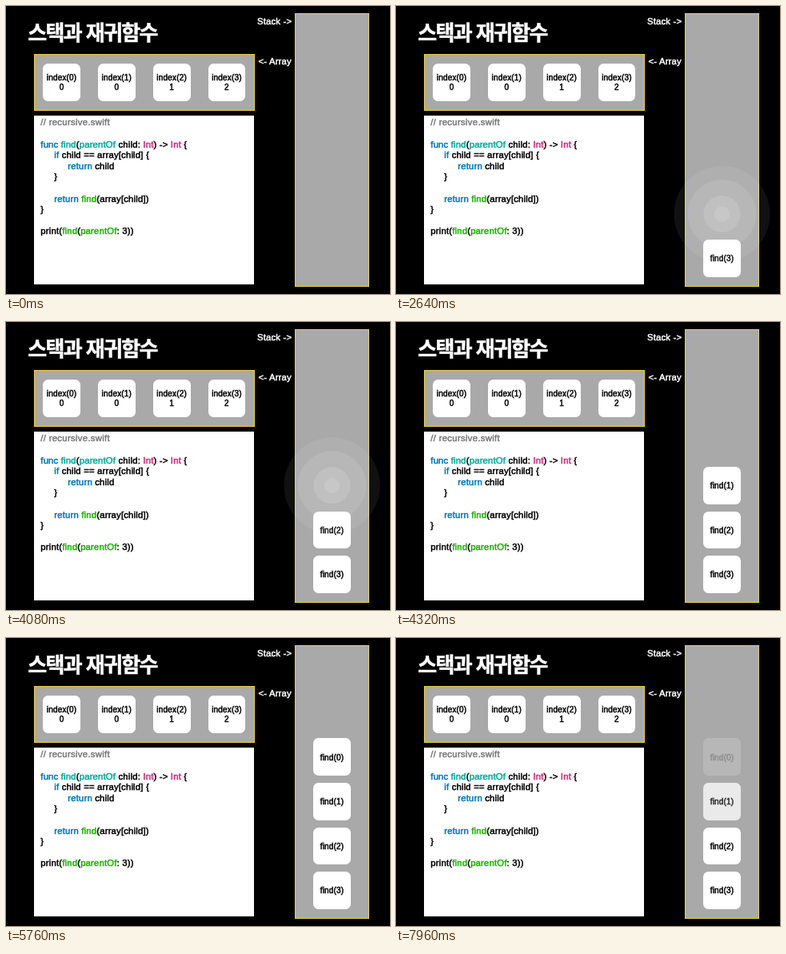
An HTML page that plays this animation: 480 by 360 pixels, repeating every 8 s.

```html
<!DOCTYPE html>
<html lang="ko">
<head>
<meta charset="utf-8">
<title>스택과 재귀함수</title>
<style>
html, body { margin: 0; width: 100%; height: 100%; overflow: hidden; background: #000; }
svg { display: block; width: 480px; height: 360px; }
text { font-family: "Liberation Sans", Arial, sans-serif; white-space: pre; stroke-width: .5px; }
.code, .label { font-size: 11.3px; letter-spacing: .19px; }
.code { fill: #000; stroke: #000; }
.label { fill: #fff; stroke: #fff; }
.cell { font-size: 10px; letter-spacing: .18px; text-anchor: middle; fill: #000; stroke: #000; }
.title { font: 700 26px "Noto Sans CJK KR", "Noto Sans CJK", sans-serif; letter-spacing: -1.65px; fill: #fff; stroke: #fff; }
.code .key { fill: #0076ba; stroke: #0076ba; }
.code .decl { fill: #00a89d; stroke: #00a89d; }
.code .type { fill: #cb297b; stroke: #cb297b; }
.code .call { fill: #1db100; stroke: #1db100; }
.code .note { fill: #797979; stroke: #797979; letter-spacing: .32px; }
</style>
</head>
<body>
<svg id="stage" viewBox="0 0 480 360">
  <defs>
    <filter id="blur" filterUnits="userSpaceOnUse" x="340" y="60" width="140" height="300">
      <feGaussianBlur stdDeviation="5"/>
    </filter>
  </defs>
  <rect width="480" height="360"/>
  <text class="title" x="27.3" y="43.3">스택과 재귀함수</text>
  <text class="label" x="314" y="23">Stack -&gt;</text>
  <text class="label" x="315.5" y="73">&lt;- Array</text>
  <rect x="35.5" y="60.5" width="275" height="70" fill="#a9a9a9" stroke="#f0d030"/>
  <rect x="35" y="137" width="275" height="211" fill="#fff"/>
  <rect x="361.5" y="9.5" width="92" height="341" fill="#a9a9a9" stroke="#dccf70"/>
  <path d="M361 350.5H454" stroke="#f0d030"/>
</svg>
<script>
const NS = 'http://www.w3.org/2000/svg';
const stage = document.getElementById('stage');
const LOOP = 8000, BEAT = 1440, SIZE = 46.7, CX = 407.5;
const FADE_AT = 6240, FADE_MS = 960, DIM = .16;

function add(parent, tag, attrs, text) {
  const el = document.createElementNS(NS, tag);
  for (const k in attrs) el.setAttribute(k, attrs[k]);
  if (text !== undefined) el.textContent = text;
  parent.appendChild(el);
  return el;
}

// Edges snap to whole pixels
function card(parent, left, top, lines) {
  const x = Math.round(left), y = Math.round(top);
  add(parent, 'rect', {
    x, y, rx: 6.5, fill: '#fff',
    width: Math.round(left + SIZE) - x, height: Math.round(top + SIZE) - y
  });
  for (const [s, dy] of lines) add(parent, 'text', { class: 'cell', x: left + SIZE / 2, y: top + dy }, s);
}

[0, 0, 1, 2].forEach((v, i) =>
  card(stage, 46.2 + 68.8 * i, 72, [[`index(${i})`, 20.5], [v, 33]]));

// Each line: x, baseline, then class and text of its parts
const code = [
  [43, 149.3, ['note', '// recursive.swift']],
  [43, 176.7, ['key', 'func '], ['decl', 'find'], ['', '('], ['decl', 'parentOf'], ['', ' child: '],
    ['type', 'Int'], ['', ') -> '], ['type', 'Int'], ['', ' {']],
  [60, 190.3, ['key', 'if'], ['', ' child == array[child] {']],
  [77, 203.9, ['key', 'return'], ['', ' child']],
  [60, 217.3, ['', '}']],
  [60, 244.6, ['key', 'return '], ['call', 'find'], ['', '(array[child])']],
  [43, 258.2, ['', '}']],
  [43, 285.4, ['', 'print('], ['call', 'find'], ['', '('], ['call', 'parentOf'], ['', ': 3))']]
];
for (const [x, y, ...parts] of code) {
  const line = add(stage, 'text', { class: 'code', x: x + .3, y });
  for (const [cls, s] of parts) add(line, 'tspan', { class: cls }, s);
}

// Soft discs shown before a card comes into focus: radius, alpha, start phase
const discs = [[60, .065, 800], [43, .095, 800], [23, .125, 1040], [9.5, .12, 1120]];
// Focus pull: phase, blur, opacity
const focus = [[1320, 14, .8], [1360, 10, .92], [1400, 5, 1]];
const blur = document.querySelector('#blur feGaussianBlur');

const calls = [0, 1, 2, 3].map(i => {
  const g = add(stage, 'g', {}), y = 292.2 - 55.6 * i;
  card(g, CX - SIZE / 2, y, [[`find(${3 - i})`, 27.1]]);
  return { g, y };
});
const glow = add(stage, 'g', { fill: '#fff' });
const rings = discs.map(() => add(glow, 'circle', { cx: CX }));

function enter({ g }, phase) {
  const step = focus.filter(f => f[0] <= phase).pop();
  const blurred = step && phase < BEAT;
  g.style.display = step ? '' : 'none';
  if (blurred) {
    blur.setAttribute('stdDeviation', step[1]);
    g.setAttribute('filter', 'url(#blur)');
  } else {
    g.removeAttribute('filter');
  }
  return blurred ? step[2] : 1;
}

function leave(ms) {
  const p = ms < 80 ? 0 : Math.min(1, ms / FADE_MS);
  return 1 + (DIM - 1) * p;
}

function showGlow(y, phase) {
  const on = phase >= 800 && phase < 1320;
  glow.style.display = on ? '' : 'none';
  if (!on) return;
  const p = Math.min(1, Math.floor((phase - 800) / 80) / 5);
  rings.forEach((c, i) => {
    const [r, a, start] = discs[i];
    c.setAttribute('cy', y + SIZE / 2);
    c.setAttribute('r', r * (.9 + .1 * p));
    c.setAttribute('fill-opacity', phase < start ? 0 : a * (.65 + .35 * p));
  });
}

function render(now) {
  const t = Math.floor((now % LOOP) / 40) * 40;
  calls.forEach((call, i) => {
    const alpha = enter(call, t - i * BEAT) * leave(t - FADE_AT - (3 - i) * BEAT);
    call.g.setAttribute('opacity', alpha);
  });
  const i = Math.floor(t / BEAT);
  if (i < calls.length) showGlow(calls[i].y, t - i * BEAT);
  else glow.style.display = 'none';
}

const begin = performance.now();
function tick() {
  render(performance.now() - begin);
  requestAnimationFrame(tick);
}
tick();
</script>
</body>
</html>
```
